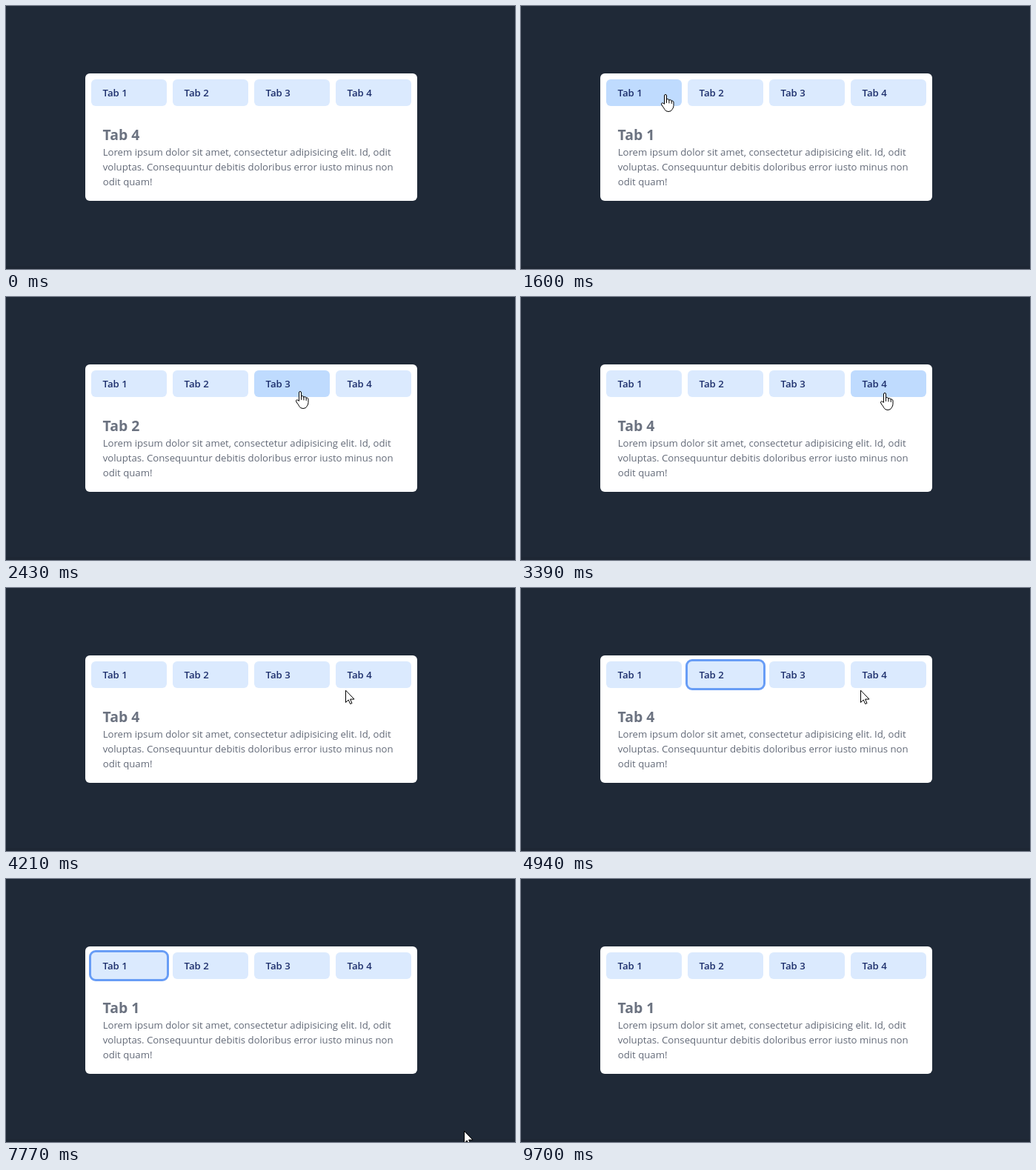
Write an HTML page that moves like this. It is 687 by 355 pixels and loops after 9840 ms.

```html
<!DOCTYPE html>
<html lang="en">
<head>
<meta charset="utf-8">
<title>Tabs</title>
<style>
  html, body { margin: 0; width: 100%; height: 100%; overflow: hidden; background: #1f2937; }
  svg { display: block; width: 687px; height: 355px; }
  text { font-family: "Open Sans", "Noto Sans", sans-serif; font-size: 13.2px; fill: #636a78; }
  .label { font-weight: 600; fill: #1d2f6c; }
  .title { font-weight: 700; font-size: 19.4px; fill: #6b7280; }
  .cursor { fill: #fff; stroke: #000; stroke-width: 1; stroke-linejoin: round; stroke-linecap: round; }
</style>
</head>
<body>
<svg viewBox="0 0 687 355" xmlns="http://www.w3.org/2000/svg">
  <rect width="687" height="355" fill="#1f2937"/>
  <rect y="351" width="687" height="4" fill="#1e2734"/>
  <rect x="107" y="91" width="448" height="172" rx="6" fill="#fff"/>
  <g id="tabs"></g>
  <rect id="ring" y="97.5" width="105" height="39" rx="7.5" fill="none" stroke="#689df6" stroke-width="3"/>
  <text id="title" class="title" x="130.5" y="181"></text>
  <text x="130.7" y="202">Lorem ipsum dolor sit amet, consectetur adipisicing elit. Id, odit</text>
  <text x="130.7" y="222">voluptas. Consequuntur debitis doloribus error iusto minus non</text>
  <text x="130.7" y="242">odit quam!</text>
  <path id="arrow" class="cursor" d="M.5 .5V16.5L4.2 13L6.7 18.5L9 17.5L6.6 12.1H11.6Z"/>
  <g id="hand" class="cursor">
    <path d="M-1.5 13V2Q-1.5 .5 0 .5T1.5 2V7.5Q1.8 6.5 3.2 6.6T4.9 8.3Q5.5 7.4 6.8 7.7T8.2 9.4Q8.8 8.7 9.8 9.1T11 11V15.5Q11 18.2 9.2 20.4Q8 23.5 4 23.5Q.2 23.5-1.2 20.5Q-2.4 18-4.2 16Q-5.8 13.8-5.5 12.6Q-4.6 11.2-3.2 12.1Z"/>
    <path d="M1.5 7.5V11.5M4.9 8.3V12M8.2 9.4V12.5" fill="none"/>
  </g>
</svg>
<script>
const LOOP = 9840;
const ENTER = 710, EXIT = 7980;
const TAB = { y: 99, width: 102, height: 36, rx: 6 };
const SVG = 'http://www.w3.org/2000/svg';
const $ = id => document.getElementById(id);
const tabX = n => 115 + 110 * (n - 1);

function add(parent, tag, attrs, text = '') {
  const el = document.createElementNS(SVG, tag);
  for (const key in attrs) el.setAttribute(key, attrs[key]);
  el.textContent = text;
  return parent.appendChild(el);
}

const tabs = [1, 2, 3, 4].map(n => {
  const box = add($('tabs'), 'rect', { x: tabX(n), ...TAB });
  add($('tabs'), 'text', { class: 'label', x: tabX(n) + 15.5, y: 122 }, 'Tab ' + n);
  return box;
});

// The pointer glides to each point and rests there until the next glide
const glides = [
  { from: 710, to: 1130, x: 180, y: 108 },
  { from: 1330, to: 1560, x: 195, y: 119 },
  { from: 1670, to: 2420, x: 397, y: 127 },
  { from: 2560, to: 2980, x: 485, y: 115 },
  { from: 3130, to: 3380, x: 491, y: 129 },
  { from: 3460, to: 4200, x: 458, y: 138 },
  { from: 5470, to: 6460, x: 455, y: 145 },
  { from: 6940, to: 7910, x: 628, y: 352 }
];

// Time and tab number from then on; 0 means none
const selected = [[0, 4], [1470, 1], [1950, 2], [2560, 3], [3130, 4], [5470, 2], [6940, 1]];
const focused = [[0, 0], [4340, 4], [4540, 3], [4740, 2], [5940, 1], [9700, 0]];

const stateAt = (list, t) => list.filter(s => s[0] <= t).pop()[1];
const ease = k => k * k * (3 - 2 * k);

function pointerAt(t) {
  if (t < ENTER || t >= EXIT) return null;
  let x = 333, y = 273;
  for (const g of glides) {
    const k = ease(Math.min(1, Math.max(0, (t - g.from) / (g.to - g.from))));
    x += (g.x - x) * k;
    y += (g.y - y) * k;
  }
  return { x: Math.round(x), y: Math.round(y) };
}

function tabUnder(p) {
  if (!p || p.y < TAB.y || p.y >= TAB.y + TAB.height) return 0;
  return [1, 2, 3, 4].find(n => p.x >= tabX(n) && p.x < tabX(n) + TAB.width) || 0;
}

const show = (el, on) => el.setAttribute('visibility', on ? 'visible' : 'hidden');

function draw(t) {
  const pos = pointerAt(t);
  const hover = tabUnder(pos);
  const focus = stateAt(focused, t);

  tabs.forEach((box, i) => box.setAttribute('fill', hover === i + 1 ? '#bfdbfe' : '#dbeafe'));
  $('title').textContent = 'Tab ' + stateAt(selected, t);
  show($('ring'), focus);
  if (focus) $('ring').setAttribute('x', tabX(focus) - 1.5);
  show($('hand'), hover);
  show($('arrow'), pos && !hover);
  if (pos) $(hover ? 'hand' : 'arrow').setAttribute('transform', `translate(${pos.x} ${pos.y})`);
}

const start = performance.now();
function tick() {
  draw((performance.now() - start) % LOOP);
  requestAnimationFrame(tick);
}
tick();
</script>
</body>
</html>
```
